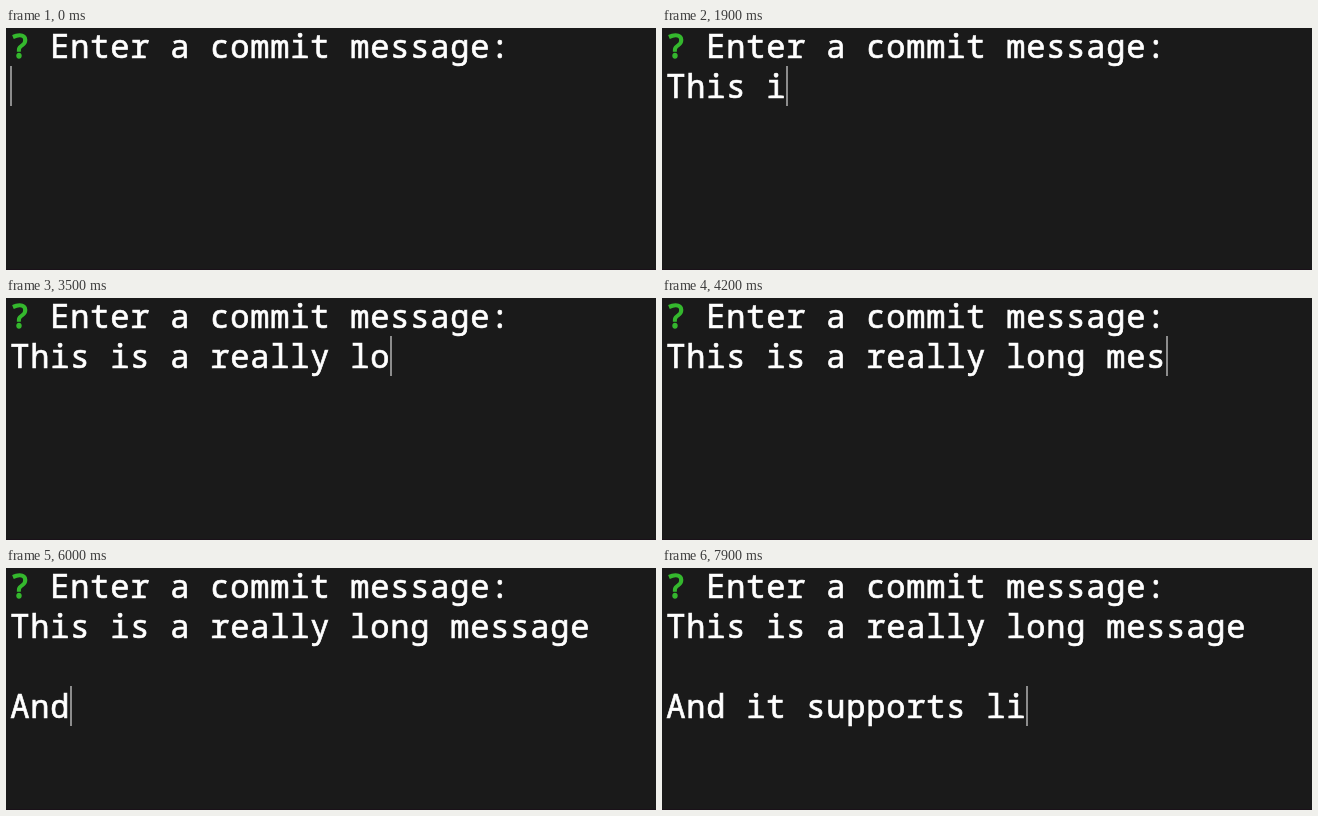
Animation of 650x242 px, one loop 8 s. Source, as an HTML page:

```html
<!DOCTYPE html>
<html lang="en">
<head>
<meta charset="utf-8">
<title>Commit message prompt</title>
<style>
  html, body { margin: 0; width: 100%; height: 100%; overflow: hidden; background: #1a1a1a; }
  body { position: relative; }
  pre {
    position: absolute; left: 4.2px; top: -2px; margin: 0;
    font: 32px/40px "Noto Sans Mono", monospace;
    letter-spacing: calc(20px - 1ch);
    color: #fff;
    -webkit-text-stroke: 0.7px;
  }
  b { font-weight: 400; color: #35b82e; -webkit-text-stroke: 1.5px; }
  #cursor { position: absolute; left: 4px; top: -2px; width: 2px; height: 40px; background: #8c8c8c; }
  #edge { position: absolute; left: 0; right: 0; bottom: 0; height: 1px; background: #1a1119; }
</style>
</head>
<body>
<pre><b>?</b> Enter a commit message:
<span id="typed"></span></pre>
<div id="cursor"></div>
<div id="edge"></div>
<script>
const LOOP = 8000, KEY = 100, CELL = 20, LINE = 40;

// Bursts of typing: start time in ms, then one character per KEY ms.
const bursts = [
  [1000, "T"], [1300, "h"], [1500, "is "], [1900, "is "], [2300, "a real"],
  [3000, "l"], [3200, "y long "], [3900, "me"], [4200, "s"], [4400, "sag"], [4800, "e"],
  [5000, "\n"], [5200, "\n"], [5700, "A"], [5900, "nd it "], [6600, "su"],
  [7000, "p"], [7200, "ports l"], [7900, "i"]
];
const typed = document.getElementById("typed");
const cursor = document.getElementById("cursor");

function textAt(t) {
  return bursts.map(([start, text]) =>
    text.slice(0, Math.max(0, Math.floor((t - start) / KEY) + 1))).join("");
}

function draw() {
  const text = textAt(performance.now() % LOOP);
  const lines = text.split("\n");
  const column = lines[lines.length - 1].length;
  typed.textContent = text;
  cursor.style.transform = `translate(${column * CELL}px, ${lines.length * LINE}px)`;
  requestAnimationFrame(draw);
}
draw();
</script>
</body>
</html>
```
